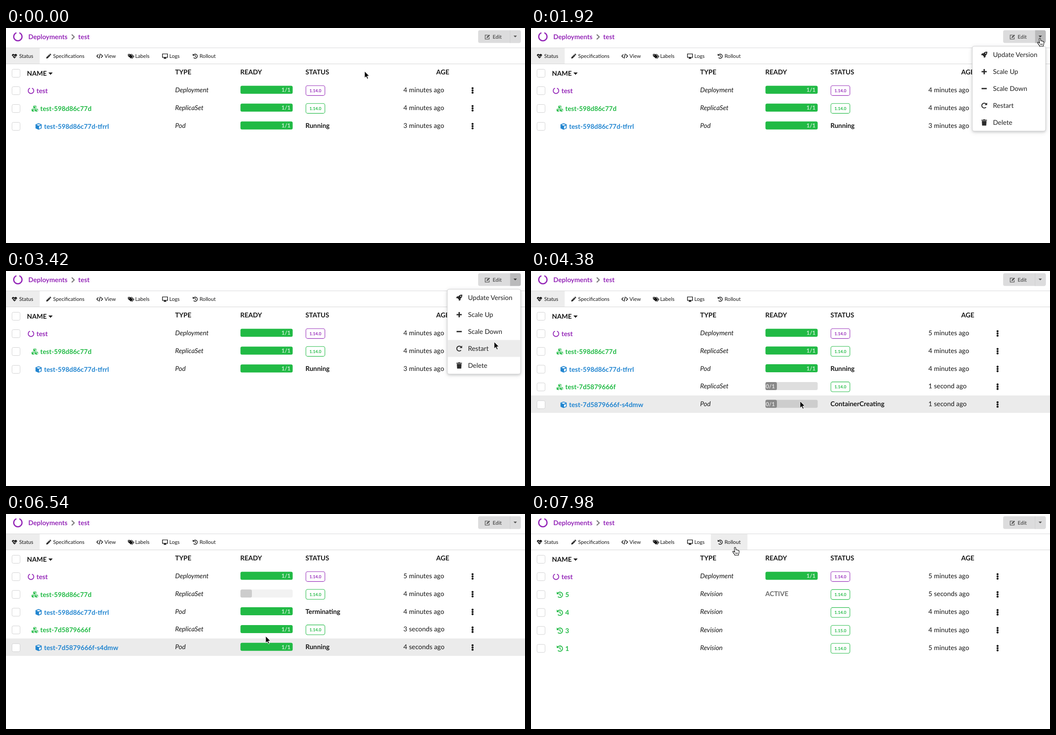
These frames come from a looping animation (1163 by 482 pixels, 8000 ms). An HTML page:

```html
<!DOCTYPE html>
<html lang="en">
<head>
<meta charset="utf-8">
<title>Deployment restart</title>
<style>
html, body { margin: 0; width: 100%; height: 100%; overflow: hidden; background: #fff; }
svg { display: block; width: 100%; height: 100%; }
text { font: 14.8px Lato, sans-serif; fill: #161616; white-space: pre; text-rendering: geometricPrecision; }
.b { font-weight: 700; }
.i { font-style: italic; }
.tab { font-size: 11.6px; }
.badge { font-size: 9.5px; font-weight: 700; text-anchor: middle; }
.pct { font-size: 12.6px; font-weight: 700; fill: #fff; fill-opacity: .75; }
#menu { filter: drop-shadow(0 2px 2px rgba(34,36,38,.13)) drop-shadow(0 2px 5px rgba(34,36,38,.15)); }
</style>
</head>
<body>
<svg viewBox="0 0 1163 482" preserveAspectRatio="none">
  <g id="tabBg"></g>
  <g id="chrome"></g>
  <g id="table"></g>
  <g id="drop"></g>
  <g id="menu"></g>
  <g id="pointer"></g>
</svg>
<script>
const PURPLE = '#9528b8', GREEN = '#21ba45', BLUE = '#2185d0', INK = '#161616';
const LOOP = 8000, STEP = 60;
const $ = id => document.getElementById(id);

const text = (x, y, s, cls = '', fill = '') =>
  `<text x="${x}" y="${y}" class="${cls}"${fill && ` style="fill:${fill}"`}>${s}</text>`;
const rect = (x, y, w, h, fill, r = 0, extra = '') =>
  `<rect x="${x}" y="${y}" width="${w}" height="${h}" rx="${r}" fill="${fill}" ${extra}/>`;
const fillPath = (d, c) => `<path d="${d}" fill="${c}"/>`;
const line = (d, c, w) => `<path d="${d}" fill="none" stroke="${c}" stroke-width="${w}"/>`;

// Icons live in a 16 unit box and are placed by their centre.
const cube = c =>
  fillPath('M8 .4L15.2 3.1V12.6L8 15.8L.8 12.6V3.1Z', c) +
  fillPath('M8 2.4L13 4.2L8 6.1L3 4.2Z', '#fff') +
  fillPath('M9 8L13.4 6.3V11.4L9 13.5Z', '#fff');
const ICONS = {
  notch: c => line('M10.3 1.8A6.6 6.6 0 1 1 5.7 1.8', c, 2),
  cube,
  cubes: c => [[4.2, .2], [.2, 7.6], [8.2, 7.6]].map(([x, y]) =>
    `<g transform="translate(${x} ${y}) scale(.49)">${cube(c)}</g>`).join(''),
  history: c => line('M3 4.8A6.3 6.3 0 1 1 3.6 12.5', c, 2) +
    fillPath('M.8 .9V6.8H6.7Z', c) + line('M8.3 4.4V8.6L10.9 10.5', c, 1.8),
  heart: c => fillPath('M8 15L1.5 8.4C-2 4 3.5-1 8 3.4C12.5-1 18 4 14.5 8.4Z', c) +
    line('M0 8.2H4.6L6.2 5L8.6 11L10.4 8.2H16', '#fff', 1.2),
  pencil: c => fillPath('M0 16L1 11.3L9.8 2.5L13.5 6.2L4.7 15Z', c) +
    fillPath('M10.7 1.6L12 .4Q13 -.3 14 .6L15.4 2Q16.3 3 15.5 4L14.4 5.3Z', c) +
    line('M3.6 11.8L10.3 5.1', '#fff', .8),
  code: c => line('M4.4 3.4L0 8L4.4 12.6M11.6 3.4L16 8L11.6 12.6M9.6 1.5L6.4 14.5', c, 2),
  tags: c => fillPath('M-5.5 1.5H1.5L9.5 9.2L3.6 15.4L-5.5 7.8Z', c) +
    line('M4.4 1.8L12.3 9.2L6.4 15.4', c, 1.8) + '<circle cx="-2.3" cy="4.6" r="1.4" fill="#fff"/>',
  desktop: c => line('M1 2H15V11.4H1Z', c, 1.8) + fillPath('M6.2 11.5H9.8L10.4 14H12V15.4H4V14H5.6Z', c),
  edit: c => line('M9 3H1V15H13V9.5', c, 1.8) + fillPath('M5 11.6L5.5 8.4L12.4 1.5L15.2 4.3L8.3 11.2Z', c),
  rocket: c => fillPath('M15.6 .4C11 0 8.2 1.4 5.8 4.6H2.6L.2 8.8H3.6L7.2 12.4V15.8L11.4 13.4V10.2C14.6 7.8 16 5 15.6 .4Z', c) +
    '<circle cx="11.7" cy="4.3" r="1.3" fill="#fff"/>',
  plus: c => line('M8 1.6V14.4M1.6 8H14.4', c, 3.2),
  minus: c => line('M1.6 8H14.4', c, 3.2),
  redo: c => line('M13.3 5.2A6 6 0 1 0 12.6 12.3', c, 2.3) + fillPath('M15.3 .8V7H9.1Z', c),
  trash: c => fillPath('M1.2 1.6H5.4L6 .4H10L10.6 1.6H14.8V3.4H1.2Z', c) +
    fillPath('M2.2 4.4H13.8L13.1 15.8H2.9Z', c)
};
const icon = (name, x, y, size, c = INK) =>
  `<g transform="translate(${x - size / 2} ${y - size / 2}) scale(${size / 16})">${ICONS[name](c)}</g>`;

const checkbox = y => rect(13.5, y - 9, 18, 18, '#fff', 3, 'stroke="#d0d0d1"');

// Fixed header, tabs and column titles
$('chrome').innerHTML =
  icon('notch', 26.6, 19.4, 22.4, PURPLE) +
  text(50, 25, 'Deployments', 'b', PURPLE) +
  line('M147.3 14.6L152.9 20L147.3 25.4', '#777', 2.2) +
  text(161.8, 25, 'test', 'b', PURPLE) +
  rect(0, 44, 1163, 1, '#d8d8d9') + rect(0, 80, 1163, 1, '#d4d4d5') +
  [['heart', 19, 12, 29.6, 'Status'], ['pencil', 95.7, 11, 105.6, 'Specifications'],
   ['code', 210, 13, 220.4, 'View'], ['tags', 283.4, 12, 289.4, 'Labels'],
   ['desktop', 356.3, 13, 366, 'Logs'], ['history', 423.8, 12, 433.7, 'Rollout']]
    .map(([n, ix, size, x, s]) => icon(n, ix, 63, size) + text(x, 67, s, 'tab')).join('') +
  checkbox(101.5) + text(47, 107, 'NAME', 'b') + fillPath('M95 99.7H104.6L99.8 105Z', INK) +
  [[379, 'TYPE'], [525, 'READY'], [671, 'STATUS'], [964, 'AGE']]
    .map(([x, s]) => text(x, 104, s, 'b')).join('');

const KINDS = {
  Deployment: { icon: 'notch', indent: 0, color: PURPLE },
  ReplicaSet: { icon: 'cubes', indent: 8.5, color: GREEN },
  Pod: { icon: 'cube', indent: 17, color: BLUE },
  Revision: { icon: 'history', indent: 8.5, color: GREEN }
};

// ready: 'full', 'none', 'off', a word or nothing
function readyCell(ready, y) {
  if (!ready) return '';
  const bar = (w, fill) => rect(525.4, y - 10.5, w, 18, fill, 3.5);
  if (ready === 'full') return bar(117, GREEN) + text(617.2, y + 3.4, '1/1', 'pct');
  if (ready === 'none' || ready === 'off')
    return `<g opacity="${ready === 'off' ? .42 : 1}">${bar(117, 'rgba(0,0,0,.13)')}${bar(25.6, '#888')}</g>` +
      (ready === 'none' ? text(526, y + 3.4, '0/1', 'pct') : '');
  return text(525, y + 4, ready, 'b', '#6c6c6c');
}

function row([name, kind, ready, status, age], y) {
  const k = KINDS[kind];
  const badge = /^\d/.test(status)
    ? rect(672, y - 10.8, 42.6, 22.2, '#fff', 4, `stroke="${k.color}" stroke-width="1.1"`) +
      text(693.3, y + 4, status, 'badge', k.color)
    : text(671, y + 4, status, 'b');
  return checkbox(y + .5) +
    icon(k.icon, 56 + k.indent, y + .7, 15.2, k.color) +
    text(68.2 + k.indent, y + 6, name, 'b', k.color) +
    text(379, y + 4, kind, 'i') + readyCell(ready, y) + badge +
    text(890.6, y + 4, age, '') +
    [-5, 0, 5].map(d => `<circle cx="1045.5" cy="${y + d}" r="2.3" fill="${INK}"/>`).join('');
}

const ago = n => `${n} second${n > 1 ? 's' : ''} ago`, mins = n => `${n} minutes ago`;

function rowsAt(t) {
  const fresh = t >= 4140, up = t >= 5820, ending = t >= 6060, gone = t >= 6660;
  const top = ['test', 'Deployment', 'full', '1.14.0', mins(fresh ? 5 : 4)];
  if (t >= 7560) return [top,
    ['5', 'Revision', 'ACTIVE', '1.14.0', ago(t < 7800 ? 4 : 5)],
    ['4', 'Revision', '', '1.14.0', mins(4)],
    ['3', 'Revision', '', '1.15.0', mins(4)],
    ['1', 'Revision', '', '1.14.0', mins(5)]];
  const age = gone ? 4 : ending ? 3 : t >= 5520 ? 2 : 1;
  const podAge = ending ? 4 : t >= 5520 ? 3 : t >= 4620 ? 2 : 1;
  const rows = [top,
    ['test-598d86c77d', 'ReplicaSet', ending ? 'off' : 'full', '1.14.0', mins(4)],
    ['test-598d86c77d-tfrrl', 'Pod', gone ? 'none' : 'full', ending ? 'Terminating' : 'Running', mins(fresh ? 4 : 3)]];
  if (fresh) rows.push(
    ['test-7d5879666f', 'ReplicaSet', up ? 'full' : 'none', '1.14.0', ago(age)],
    ['test-7d5879666f-s4dmw', 'Pod', up ? 'full' : 'none', up ? 'Running' : 'ContainerCreating', ago(podAge)]);
  return rows;
}

// Pointer path: time, x, y
const PATH = [
  [0, 802.5, 96], [300, 802.5, 96], [900, 1137, 47], [1440, 1137, 47], [1740, 1141, 23],
  [2160, 1141, 23], [2940, 1093, 160], [3360, 1093, 160], [3420, 1093, 158], [4200, 640, 268],
  [4620, 598, 313], [4920, 594, 305.5], [5340, 588, 297], [6420, 588, 297], [6540, 581, 273],
  [6720, 514, 152], [6780, 503.5, 140], [7200, 458, 74.5], [8000, 458, 74.5]];

function slope(i, a) {
  const p = PATH[i - 1], q = PATH[i], r = PATH[i + 1];
  if (!p || !r || (p[1] === q[1] && p[2] === q[2]) || (q[1] === r[1] && q[2] === r[2])) return 0;
  return (r[a] - p[a]) / (r[0] - p[0]);
}

function pointerAt(t) {
  const i = Math.max(0, PATH.findIndex(p => p[0] > t) - 1);
  const p = PATH[i], q = PATH[i + 1], d = q[0] - p[0], u = (t - p[0]) / d;
  return [1, 2].map(a => {
    const s = u * u * (3 - 2 * u);
    return p[a] + (q[a] - p[a]) * s +
      d * u * (1 - u) * ((1 - u) * slope(i, a) - u * slope(i + 1, a));
  });
}

const ARROW = `<path transform="translate(.9 .9)" d="M0 0V15.2L3.5 11.9L6 17.4L8.4 16.4L6 10.9H10.8Z" fill="#000" stroke="#fff" stroke-width="1"/>`;
const HAND = `<g transform="translate(-.9 0)"><path d="M-1.5 1.2Q0 -1.2 1.5 1.2L2.3 6Q4 4.8 4.9 6.6Q6.6 5.6 7.3 7.4Q9.2 6.8 9.3 9.2Q9.6 13 7.9 15.6V18H-.6V16.4Q-3 13.8-5 10.4Q-5.2 8.3-3 9L-.4 11.2Z"
  fill="#fff" stroke="#111" stroke-width="1.2" stroke-linejoin="round"/><path d="M1.6 12V15.4M3.6 12V15.4M5.6 12V15.4" stroke="#111" stroke-width=".9"/></g>`;

const ITEMS = [['rocket', 'Update Version'], ['plus', 'Scale Up'], ['minus', 'Scale Down'],
  ['redo', 'Restart'], ['trash', 'Delete']];
const EDGES = [120, 160, 200, 240, 279, 318];

const shown = {};
function put(id, html) {
  if (shown[id] !== html) $(id).innerHTML = shown[id] = html;
}

function draw(t) {
  const [x, y] = pointerAt(t);
  const [hx, hy] = pointerAt(Math.max(0, t - STEP));
  const open = t >= 1860 && t <= 3420, rollout = t >= 7500;
  const onDrop = (px, py) => px > 1129 && px < 1153 && py < 34;
  const onTab = (px, py) => px > 403 && px < 484 && py > 44 && py < 80;

  put('tabBg', rollout ? rect(403, 45, 82, 35, '#ededed')
    : rect(0, 45, 75.5, 35, '#ededed') + (onTab(hx, hy) ? rect(403, 45, 82, 35, '#f7f7f7') : ''));

  const rows = rowsAt(t);
  const lane = open ? -1 : EDGES.findIndex((e, i) => hy >= e && hy < EDGES[i + 1]);
  const pitch = t >= 7560 ? 40.2 : t >= 4140 ? 39.8 : 40;
  put('table', (lane >= 0 && lane < rows.length
    ? rect(0, EDGES[lane], 1163, EDGES[lane + 1] - EDGES[lane], '#ebebeb') : '') +
    rows.map((r, i) => row(r, 140 + i * pitch)).join(''));

  const shade = open ? '#bababb' : onDrop(hx, hy) ? '#cacbcc' : '#dcdcdd';
  put('drop', rect(1058, 5, 95.5, 28.5, '#dcdcdd', 4) +
    fillPath('M1129.5 5H1149.5Q1153.5 5 1153.5 9V29.5Q1153.5 33.5 1149.5 33.5H1129.5Z', shade) +
    rect(1129, 5, 1, 28.5, '#cfcfd0') +
    icon('edit', 1079, 19.6, 12, '#555') + text(1090.6, 24, 'Edit', 'b tab', '#5a5a5a') +
    fillPath('M1137.3 17H1144.9L1141.1 21Z', open ? '#333' : '#555'));

  const pick = hx > 989 && hx < 1153 && hy > 41 ? Math.floor((hy - 41) / 37.9) : -1;
  put('menu', open ? rect(989, 41, 164, 190, '#fff', 4, 'stroke="#d4d4d5"') +
    ITEMS.map(([n, s], i) => (i === pick ? rect(989.5, 41 + i * 37.9, 163, 37.9, '#ececec') : '') +
      icon(n, 1015.5, 60 + i * 37.9, 14.6, '#2b2b2b') +
      text(1035.2, 65 + i * 37.9, s, '', '#212121')).join('') : '');

  const hand = onDrop(x, y) || onTab(x, y) || (open && t < 3420);
  put('pointer', hand ? HAND : ARROW);
  $('pointer').setAttribute('transform', `translate(${x.toFixed(2)} ${y.toFixed(2)})`);
}

const start = performance.now();
function tick() {
  const t = (performance.now() - start) % LOOP;
  draw(Math.floor(t / STEP) * STEP);
  requestAnimationFrame(tick);
}
tick();
</script>
</body>
</html>
```
